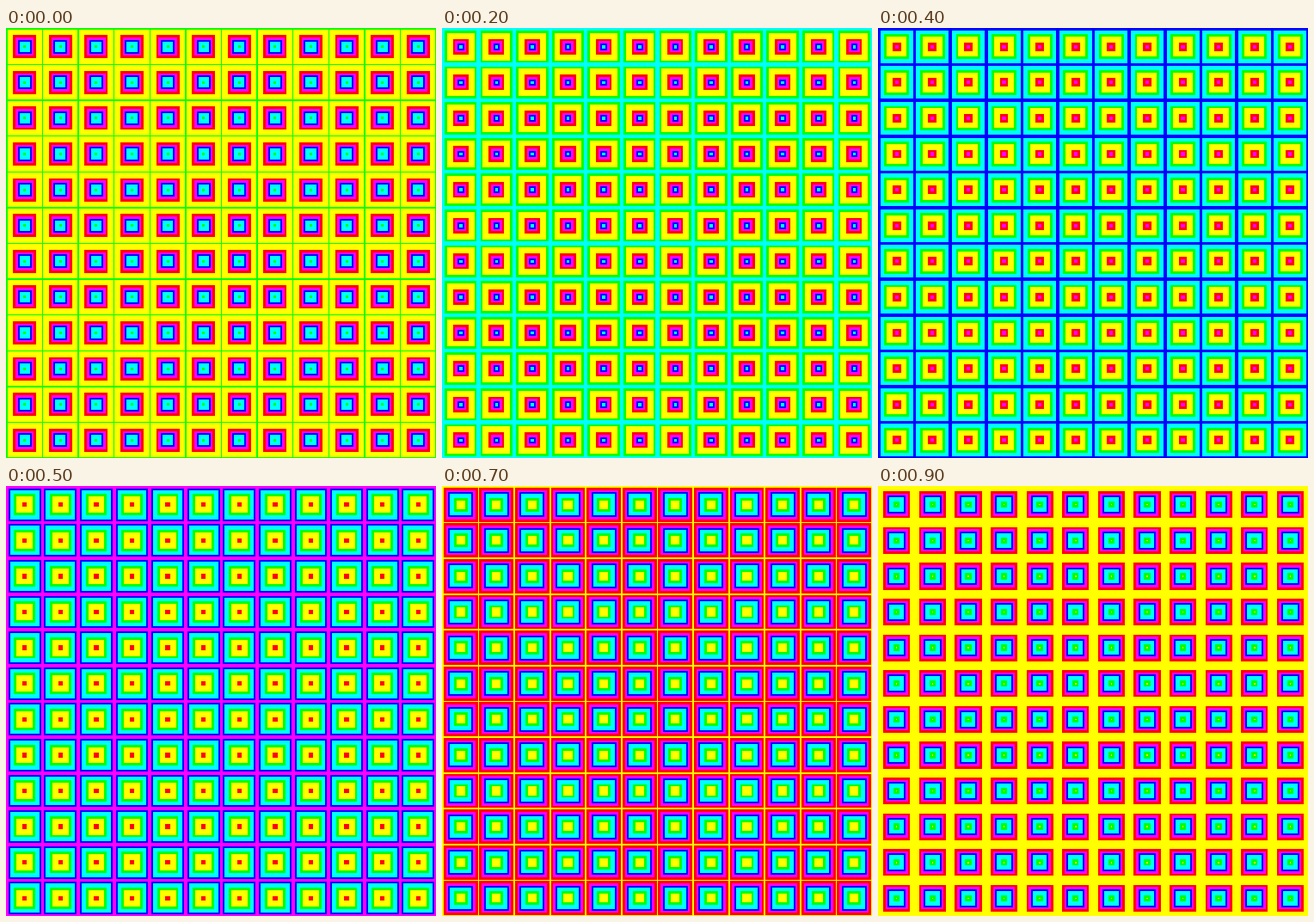
An HTML page with a canvas for the animation above (1000 ms loop, 500 px wide and 500 px high).

```html
<!DOCTYPE html>
<html lang="en">
<head>
<meta charset="utf-8">
<title>Shrinking squares</title>
<style>
  html, body { margin: 0; width: 100%; height: 100%; overflow: hidden; background: #ff0; }
  canvas { display: block; width: 500px; height: 500px; }
</style>
</head>
<body>
<canvas id="stage" width="500" height="500"></canvas>
<script>
const ctx = document.getElementById('stage').getContext('2d');
const CELLS = 12, PITCH = 41.6, FIRST = 21.7;
const REACH = PITCH / 2;        // half a cell
const TRAVEL = 21.5;            // how far each edge moves inwards per loop
const LOOP = 1000, STEP = 100;

// Outer half-size of each colour band at the start of the loop.
const bands = [
  ['#0f0', 1.5], ['#0ff', 6.1], ['#00f', 8.1],
  ['#f0f', 10.7], ['#f00', 13.45], ['#ff0', 20.15]
];
const centers = Array.from({ length: CELLS }, (_, i) => FIRST + i * PITCH);

function square(x, y, r) {
  const left = Math.round(x - r), top = Math.round(y - r);
  ctx.fillRect(left, top, Math.round(x + r) - left, Math.round(y + r) - top);
}

function draw(phase) {
  const rings = [];
  for (let turn = 0; turn < 3; turn++) {
    for (const [color, edge] of bands) {
      rings.push({ color, r: edge + (turn - phase) * TRAVEL });
    }
  }
  const outer = rings.find(ring => ring.r >= REACH);
  ctx.fillStyle = outer.color;
  ctx.fillRect(0, 0, 500, 500);

  const inner = rings.filter(ring => ring.r > 0 && ring.r < REACH);
  for (const { color, r } of inner.reverse()) {
    ctx.fillStyle = color;
    for (const y of centers) for (const x of centers) square(x, y, r);
  }
}

let shown = -1;
function tick() {
  const step = Math.floor(performance.now() % LOOP / STEP);
  if (step !== shown) {
    shown = step;
    draw(step * STEP / LOOP);
  }
  requestAnimationFrame(tick);
}
tick();
</script>
</body>
</html>
```
